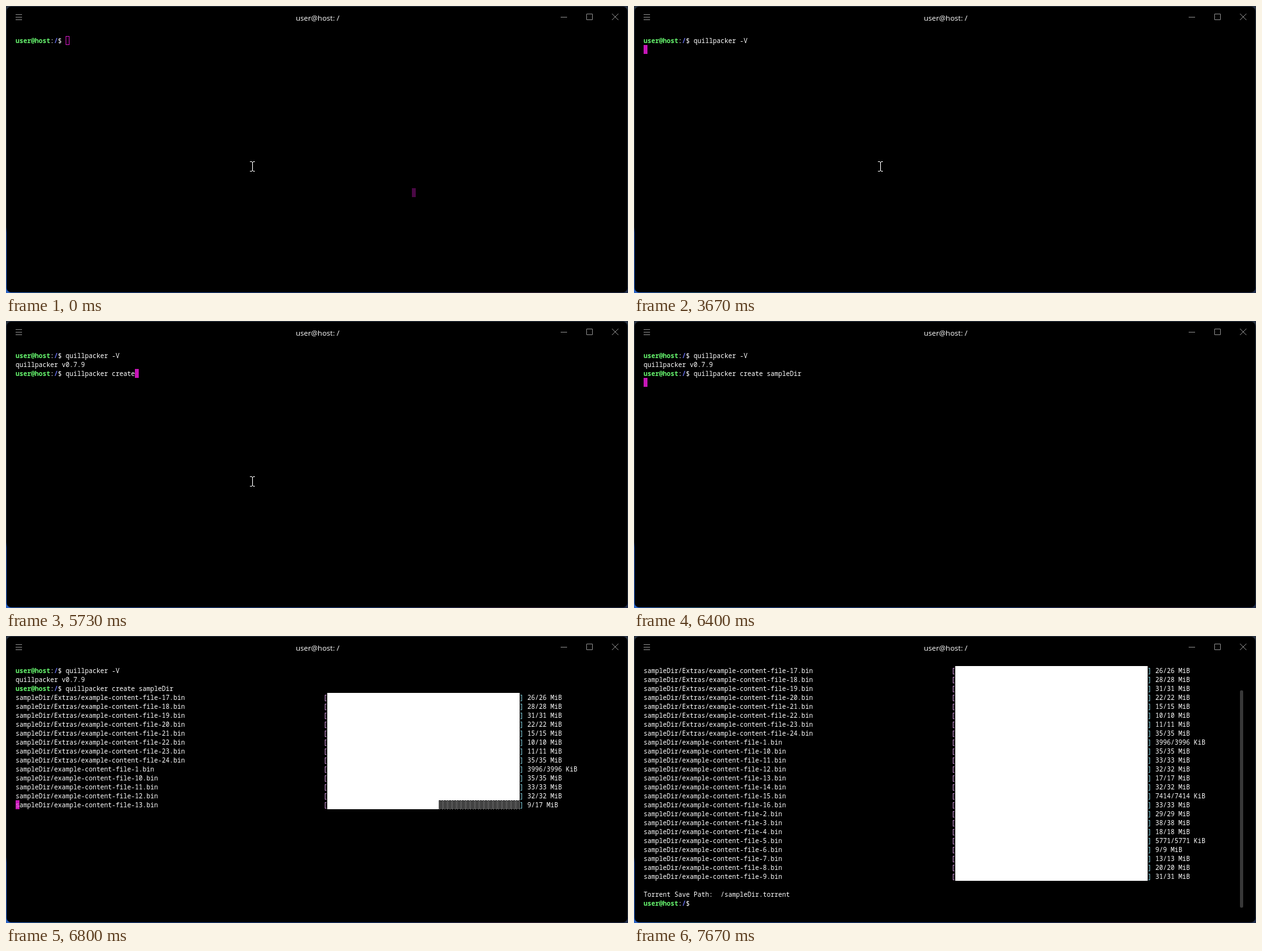
Write an HTML page that moves like this. It is 970x449 px and loops after 8 s.

```html
<!DOCTYPE html>
<html lang="en">
<head>
<meta charset="utf-8">
<title>Terminal</title>
<style>
  html, body { margin: 0; width: 100%; height: 100%; overflow: hidden; background: #000; }
  svg { display: block; }
  #screen text { font: 500 10px "Noto Sans Mono", "DejaVu Sans Mono", monospace; fill: #fff; white-space: pre; }
  #screen .user { font-weight: 700; fill: #67f86f; }
  #screen .dir { font-weight: 700; fill: #6a76fb; }
  #screen .open { fill: #f4b0ff; }
  #screen .close { fill: #8fe8f8; }
  #screen .under { fill: #e08ad8; }
  .title { font: 500 11.5px "Open Sans", "Noto Sans", sans-serif; fill: #fff; }
  .icons { fill: none; stroke: #858585; }
</style>
</head>
<body>
<svg width="970" height="449" viewBox="0 0 970 449">
  <defs>
    <linearGradient id="side" x1="0" y1="0" x2="0" y2="1">
      <stop offset="0" stop-color="#2a3442"/>
      <stop offset=".77" stop-color="#222c3a"/>
      <stop offset=".79" stop-color="#2450a8"/>
      <stop offset="1" stop-color="#2a62c4"/>
    </linearGradient>
    <linearGradient id="base">
      <stop offset="0" stop-color="#2a62c4"/>
      <stop offset=".1" stop-color="#2b5f86"/>
      <stop offset=".2" stop-color="#1f458c"/>
      <stop offset=".6" stop-color="#1c3a78"/>
      <stop offset=".82" stop-color="#3a2a40"/>
      <stop offset="1" stop-color="#1f2b48"/>
    </linearGradient>
    <pattern id="shade" width="4" height="2" patternUnits="userSpaceOnUse">
      <path d="M0 0h1v1H0zM2 1h1v1H2z" fill="#fff" shape-rendering="crispEdges"/>
    </pattern>
  </defs>

  <rect width="970" height="449" fill="#2a3442"/>
  <rect width="9" height="449" fill="url(#side)"/>
  <rect y="440" width="970" height="9" fill="url(#base)"/>
  <rect x="1" y="1" width="968" height="447" rx="7" fill="#000"/>

  <text class="title" x="486" y="23" text-anchor="middle">user@host: /</text>
  <g class="icons">
    <path d="M15 13.5h10M15 17.5h10M15 21.5h10"/>
    <path d="M865 17.5h10M905.5 12.5h9v9h-9zM945 12l10 10M955 12l-10 10"/>
  </g>

  <g id="screen"></g>
  <rect id="ghost" x="633" y="285" width="6" height="14" fill="#4a0845"/>
  <rect id="scrollbar" x="945" y="85" width="5" height="340" rx="2" fill="#383838"/>
  <path id="pointer" d="M-3.5 -7.5H-1L.5 -6.5L2 -7.5H4M.5 -7V7M-3.5 7.5H-1L.5 6.5L2 7.5H4" fill="none" stroke="#fff"/>
</svg>

<script>
const LOOP = 8000, FPS = 15;
const LEFT = 15, TOP = 47, CELL_W = 6, CELL_H = 14, ASCENT = 11;
const BAR_COL = 81, BAR_CELLS = 50;
const PROMPT_LEN = 13, MAGENTA = "#c616b7";
const COMMANDS = ["quillpacker -V", "quillpacker create sampleDir"];

// Ticks (1/15 s) at which things happen
const FOCUS = 14, TYPE_1 = 43, ENTER_1 = 55, OUTPUT = 58, READY = 59;
const TYPE_2 = 77, ENTER_2 = 96, HASH = 99, DONE = 106;
const CURSOR_OFF = [[23, 33], [42, 44], [68, 77], [115, 120]];

// Values above 1000 are KiB, the others MiB
const sizes = [26, 28, 31, 22, 15, 10, 11, 35, 3996, 35, 33, 32,
  17, 32, 7414, 33, 29, 38, 18, 5771, 9, 13, 20, 31];
const range = (from, to) => Array.from({ length: to - from + 1 }, (_, i) => from + i);
const names = [
  ...range(17, 24).map(n => `Extras/example-content-file-${n}`),
  ...range(1, 16).sort().map(n => `example-content-file-${n}`)
];
const files = sizes.map((size, i) => {
  const kib = size > 1000;
  return { name: `sampleDir/${names[i]}.bin`, size, unit: kib ? "KiB" : "MiB", scale: kib ? 1024 : 1 };
});

const el = id => document.getElementById(id);
const screen = el("screen"), ghost = el("ghost"), scrollbar = el("scrollbar"), pointer = el("pointer");

const colX = col => LEFT + col * CELL_W;
const rowY = row => TOP + row * CELL_H;
const clamp = (v, lo, hi) => Math.max(lo, Math.min(hi, v));
const show = (node, on) => node.setAttribute("visibility", on ? "visible" : "hidden");

function text(row, col, str, cls = "") {
  return `<text class="${cls}" x="${colX(col)}" y="${rowY(row) + ASCENT}">${str}</text>`;
}

function block(row, col, cells, fill) {
  return `<rect x="${colX(col)}" y="${rowY(row)}" width="${cells * CELL_W}" height="${CELL_H}" fill="${fill}"/>`;
}

function prompt(row, command = "") {
  return text(row, 0, "user@host", "user") + text(row, 9, ":") +
    text(row, 10, "/", "dir") + text(row, 11, "$ " + command);
}

function fileRow(row, file, done) {
  const full = Math.round(BAR_CELLS * done / file.size);
  return text(row, 0, file.name) + text(row, BAR_COL - 1, "[", "open") +
    block(row, BAR_COL, full, "#fff") +
    block(row, BAR_COL + full, BAR_CELLS - full, "url(#shade)") +
    text(row, BAR_COL + BAR_CELLS, "]", "close") +
    text(row, BAR_COL + BAR_CELLS + 2, `${Math.floor(done)}/${file.size} ${file.unit}`);
}

// Hashing runs at a steady rate through all files
function fileList(tick, firstRow) {
  let left = 58.72 + (tick - HASH) * 77.66, row = firstRow, out = "";
  for (const file of files) {
    if (left <= 0) break;
    out += fileRow(row++, file, Math.min(file.size, left * file.scale));
    left -= file.size / file.scale;
  }
  return { out, lastRow: row - 1 };
}

function cursor(tick, row, col) {
  if (tick < FOCUS) {
    return `<rect x="${colX(col) + .5}" y="${rowY(row) + .5}" width="5" height="13" fill="none" stroke="${MAGENTA}"/>`;
  }
  const off = CURSOR_OFF.some(([from, to]) => tick >= from && tick < to);
  return off ? "" : block(row, col, 1, MAGENTA);
}

function session(tick) {
  if (tick >= DONE) {
    return fileList(tick, 0).out + text(25, 0, "Torrent Save Path:  /sampleDir.torrent") +
      prompt(26) + cursor(tick, 26, PROMPT_LEN);
  }
  const typed1 = clamp((tick - TYPE_1) * 2, 0, COMMANDS[0].length);
  const typed2 = clamp(Math.floor((tick - TYPE_2) * 25 / 12), 0, COMMANDS[1].length);
  let out = prompt(0, COMMANDS[0].slice(0, typed1));
  if (tick >= OUTPUT) out += text(1, 0, "quillpacker v0.7.9");
  if (tick >= READY) out += prompt(2, COMMANDS[1].slice(0, typed2));

  if (tick >= HASH) {
    const list = fileList(tick, 3);
    return out + list.out + cursor(tick, list.lastRow, 0) + text(list.lastRow, 0, "s", "under");
  }
  if (tick >= ENTER_2) return out + cursor(tick, 3, 0);
  if (tick >= READY) return out + cursor(tick, 2, PROMPT_LEN + typed2);
  if (tick >= OUTPUT) return out + cursor(tick, 2, 0);
  if (tick >= ENTER_1) return out + cursor(tick, 1, 0);
  return out + cursor(tick, 0, PROMPT_LEN + typed1);
}

let lastTick = -1;
function draw(time) {
  const tick = Math.floor((time % LOOP + 4) * FPS / 1000) % (LOOP * FPS / 1000);
  if (tick === lastTick) return;
  lastTick = tick;
  screen.innerHTML = session(tick);
  show(ghost, tick < FOCUS);
  show(scrollbar, tick >= DONE);
  show(pointer, tick < ENTER_2);
  const drop = clamp((tick - 91) / 4, 0, 1);
  pointer.setAttribute("transform", `translate(384 ${251 + Math.round(154 * drop * drop)})`);
}

const start = performance.now();
function loop() {
  draw(performance.now() - start);
  requestAnimationFrame(loop);
}
loop();
</script>
</body>
</html>
```
